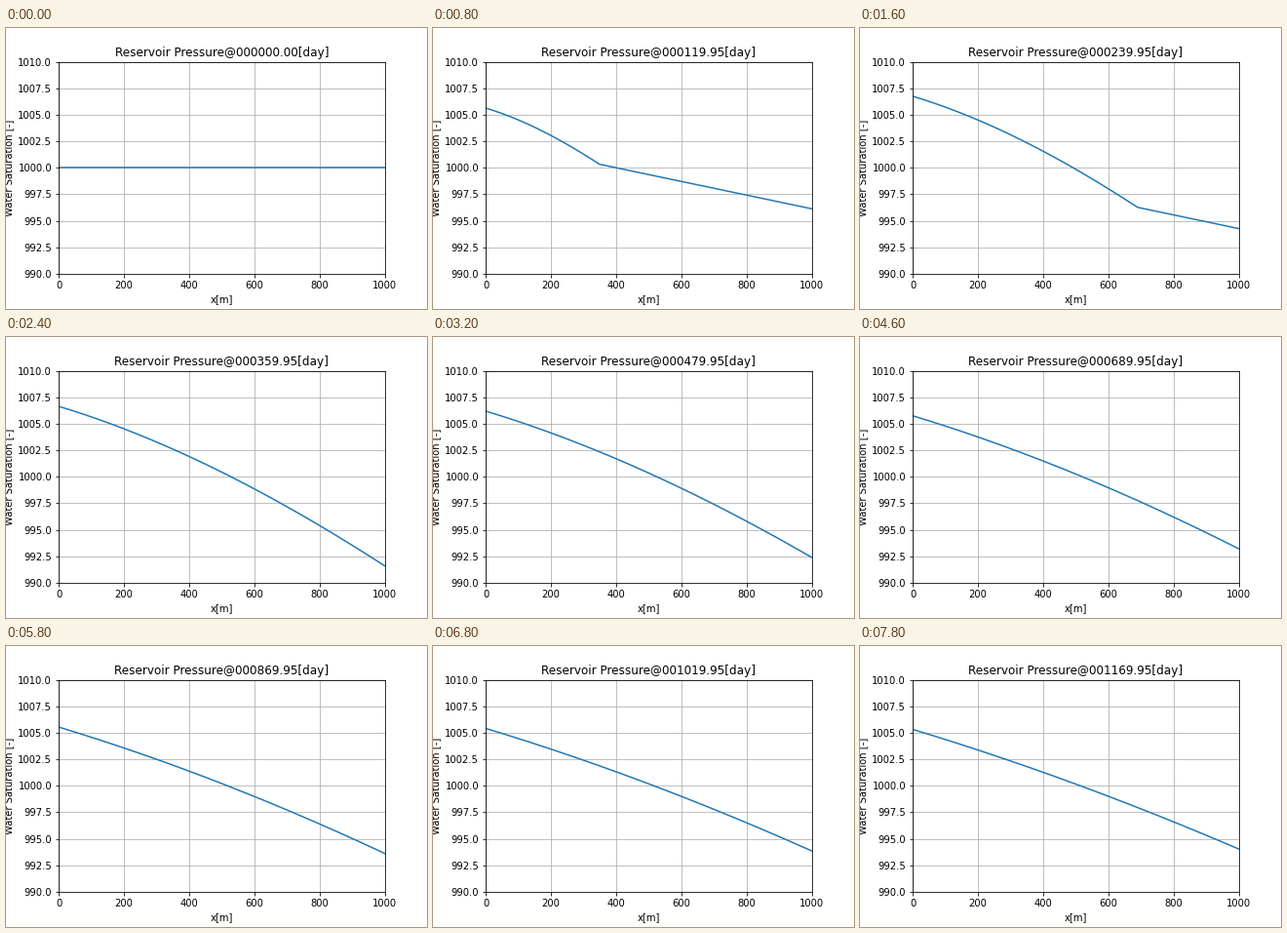
Recreate the animation shown at these times as a matplotlib script. Size 432x288 px, loop 8 s.

```python
import numpy as np
import matplotlib.pyplot as plt
from matplotlib.animation import FuncAnimation

FRAMES, INTERVAL = 40, 200
LENGTH = 1000.0          # reservoir length [m]
MEAN_P = 1000.0          # mean pressure is conserved
OIL_SLOPE = 0.00645      # pressure drop per metre ahead of the front

plt.rcParams["font.family"] = "DejaVu Sans"
plt.rcParams["font.size"] = 10


def day(i):
    return max(0.0, 30.0 * i - 0.05)


def drop(x, front):
    """Pressure lost between the inlet and x for a flood front at `front`."""
    u = np.minimum(x / front, 1.0)
    swept = front * (0.0093 * u + 0.0069 * u**2 - 0.001 * u**3)
    return swept + OIL_SLOPE * np.maximum(x - front, 0.0)


def pressure(x, t):
    if t == 0:
        return np.full_like(x, MEAN_P)
    d = drop(x, 2.84 * t + 8)
    mean = np.sum((d[1:] + d[:-1]) / 2 * np.diff(x)) / LENGTH
    return MEAN_P + mean - d


x = np.linspace(0, LENGTH, 201)

fig, ax = plt.subplots(figsize=(6, 4), dpi=72, facecolor="white")
fig.subplots_adjust(left=0.125, right=0.9, bottom=0.125, top=0.88)
line, = ax.plot(x, pressure(x, 0), color="#1f77b4", lw=1.5)
ax.set_xlim(0, LENGTH)
ax.set_ylim(990, 1010)
ax.set_xlabel("x[m]")
ax.set_ylabel("Water Saturation [-]")
ax.grid(True)
title = ax.set_title("", fontsize=12)


def update(i):
    t = day(i)
    line.set_ydata(pressure(x, t))
    title.set_text(f"Reservoir Pressure@{t:09.2f}[day]")
    return line, title


anim = FuncAnimation(fig, update, frames=FRAMES, interval=INTERVAL,
                     init_func=lambda: update(0), repeat=True,
                     repeat_delay=0, blit=False)
plt.show()
```
